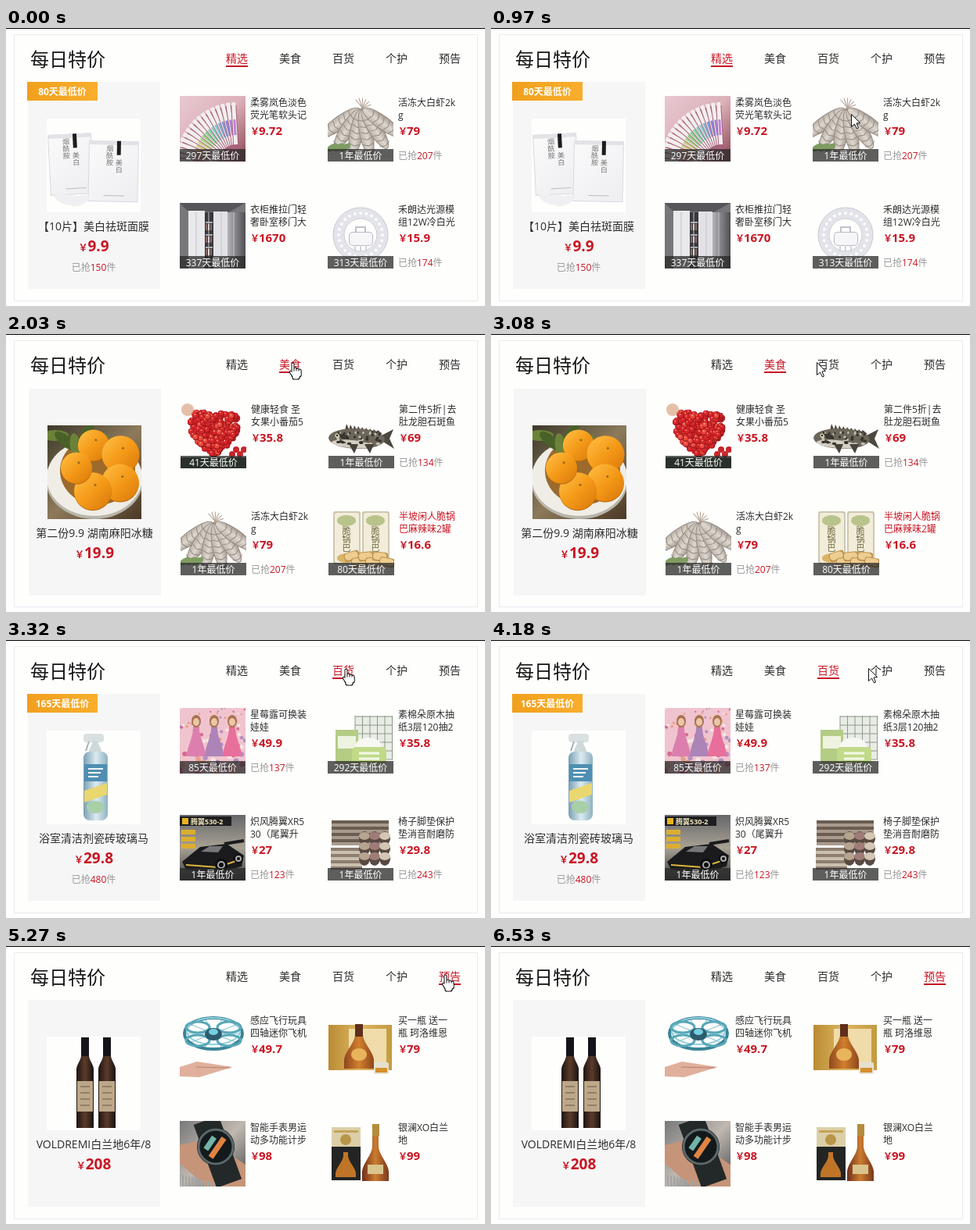
Animation of 612 by 356 pixels, one loop 7.13 s. Source, as an HTML page with a canvas:

```html
<!DOCTYPE html>
<html lang="zh">
<head>
<meta charset="utf-8">
<title>每日特价</title>
<style>
html, body { margin: 0; width: 100%; height: 100%; overflow: hidden; background: #fefefd; }
canvas { display: block; width: 612px; height: 356px; }
</style>
</head>
<body>
<canvas id="stage" width="612" height="356"></canvas>
<script>
const W = 612, H = 356, LOOP = 7130;
const FONT = '"Open Sans", "Noto Sans CJK SC", "Noto Sans CJK", sans-serif';
const PAPER = '#fefefd', INK = '#2c2c2c', RED = '#c81623', GREY = '#999';
const TABS = ['精选', '美食', '百货', '个护', '预告'];
const stage = document.getElementById('stage').getContext('2d');
let g = stage;

// Drawing helpers
const each = (n, f) => { for (let i = 0; i < n; i++) f(i); };
const smooth = k => { k = Math.min(1, Math.max(0, k)); return k * k * (3 - 2 * k); };
const polar = (x, y, r, a) => [x + r * Math.cos(a), y + r * Math.sin(a)];

function rect(c, x, y, w, h) { g.fillStyle = c; g.fillRect(x, y, w, h); }
function round(c, x, y, w, h, r) {
  g.fillStyle = c; g.beginPath(); g.roundRect(x, y, w, h, r); g.fill();
}
function oval(c, x, y, rx, ry = rx, a = 0) {
  g.fillStyle = c; g.beginPath(); g.ellipse(x, y, rx, ry, a, 0, 7); g.fill();
}
function ring(c, w, x, y, rx, ry = rx) {
  g.strokeStyle = c; g.lineWidth = w; g.beginPath(); g.ellipse(x, y, rx, ry, 0, 0, 7); g.stroke();
}
function trace(p) {
  g.beginPath();
  for (let i = 0; i < p.length; i += 2) g.lineTo(p[i], p[i + 1]);
}
function poly(c, ...p) { trace(p); g.fillStyle = c; g.fill(); }
function line(c, w, ...p) { trace(p); g.strokeStyle = c; g.lineWidth = w; g.stroke(); }
function shade(x0, y0, x1, y1, ...cs) {
  const f = g.createLinearGradient(x0, y0, x1, y1);
  cs.forEach((c, i) => f.addColorStop(i / (cs.length - 1), c));
  return f;
}
function turned(x, y, a, draw) {
  g.save(); g.translate(x, y); g.rotate(a); draw(); g.restore();
}
function scatter(seed, n, draw) {
  const rnd = () => (seed = (seed * 16807) % 2147483647) / 2147483647;
  each(n, i => draw(rnd(), rnd(), i));
}
// Bottle outline: a neck that widens smoothly at the shoulder
function flask(c, x, top, bottom, neck, belly, from, to) {
  const half = y => neck + (belly - neck) * smooth((y - from) / (to - from));
  g.beginPath();
  for (let y = top; y <= bottom; y++) g.lineTo(x - half(y), y);
  for (let y = bottom; y >= top; y--) g.lineTo(x + half(y), y);
  g.fillStyle = c; g.fill();
}
function text(s, x, y, size, c, bold = false, align = 'left') {
  g.font = `${bold ? 'bold ' : ''}${size}px ${FONT}`;
  g.textAlign = align;
  g.fillStyle = c;
  g.fillText(s, x, y);
}
function upright(s, x, y, size, c) {
  [...s].forEach((ch, i) => text(ch, x, y + i * size, size, c, false, 'center'));
}
function width(s, size, bold) {
  g.font = `${bold ? 'bold ' : ''}${size}px ${FONT}`;
  return g.measureText(s).width;
}

// Large pictures, 120 x 120
function masks() {
  each(2, i => turned(1 + i * 53, 21 + i * 7, i ? .02 : -.05, () => {
    const w = 56 + i * 8;
    rect('#d9d9dd', 0, 0, w, 78);
    rect(shade(0, 0, w, 78, '#fafafb', '#eeeef1'), 1, 1, w - 2, 76);
    rect('#e2e2e7', 0, 0, w, 5);
    upright('烟酰胺', 23 + i * 4, 13, 9, '#777');
    upright('美白', 35 + i * 4, 31, 9, '#777');
    rect('#1c1c1c', 32 + i * 4, 0, 5, 18);
    line('#bbb', 1, 20, 70, 46, 70);
  }));
  each(3, i => oval('#f0f0f3', 22 + i * 10, 103 + i, 13, 6, .4 - i * .4));
}
function oranges() {
  rect(shade(0, 0, 120, 120, '#3b3829', '#8d7a5b', '#4b3826'), 0, 0, 120, 120);
  oval('#b9b5aa', 60, 70, 62, 50);
  oval('#efede6', 60, 67, 61, 49);
  oval('#9b6a2c', 64, 58, 48, 44);
  each(5, i => oval(i % 2 ? '#496128' : '#6b8238', 10 + i * 13, 13 + i % 3 * 7, 17, 7, i * .7));
  each(5, i => {
    const [x, y] = polar(68, 55, 31, -1.87 + i * Math.PI * .4), r = i && i < 4 ? 24 : 20;
    oval('#b9690c', x, y + 1, r);
    oval(shade(x - r, y - r, x + r, y + r, '#ffc24a', '#f59a18', '#d8770a'), x, y, r);
    oval('#8d6a20', x + 3, y - r / 3, 1.5);
  });
}
function sprayer() {
  const body = shade(48, 0, 78, 0, '#7fa3b5', '#dcebf2', '#8fb2c0');
  round('#d9e0e2', 47, 4, 26, 11, 4);
  line('#a5b0b4', 2, 54, 14, 50, 26);
  flask('#cfd8da', 62, 13, 27, 4, 8, 15, 27);
  round(body, 47, 27, 31, 88, 8);
  rect('#4f8fb3', 48, 43, 29, 22);
  each(3, i => line('#f2f6f8', 2, 53, 49 + i * 5, 72 - i * 3, 49 + i * 5));
  poly('#e9d76f', 48, 77, 77, 67, 77, 82, 48, 92);
  oval('#a8cfa8', 62, 98, 11, 8);
}
function herbs() {
  rect(shade(24, 0, 107, 0, '#6f9fa0', '#79a79b', '#f0ead6'), 24, 14, 83, 50);
  rect('#f0ead6', 84, 14, 23, 50);
  scatter(17, 16, (u, v, i) =>
    oval(['#d58a4e', '#efe2c4', '#b8503c', '#37696d'][i % 4], 30 + u * 48, 22 + v * 36, 7, 4, v * 3));
  round('#6b4634', 9, 61, 41, 58, 8);
  rect('#2f2c2a', 12, 52, 36, 13);
  rect('#d9b88a', 10, 73, 39, 31);
  scatter(29, 9, (u, v, i) => oval(i % 2 ? '#b2473a' : '#5f8f8d', 14 + u * 18, 77 + v * 23, 4, 3));
  rect('#f0e6d0', 35, 77, 9, 24);
  turned(65, 76, .06, () => { rect('#f1ebd8', 0, 0, 39, 32); oval('#a09a85', 20, 16, 4); });
}
function bottles() {
  each(2, i => {
    const x = 49 + i * 28;
    flask(shade(x - 11, 0, x + 11, 0, '#1d1512', '#5c3b2b', '#1a1311'), x, 1, 117, 5, 11, 24, 42);
    rect('#17131a', x - 5, 1, 10, 24);
    rect('#bda789', x - 10, 57, 20, 39);
    each(4, j => line('#6c5543', 1, x - 6, 64 + j * 8, x + 6, 64 + j * 8));
  });
}

// Small pictures, 84 x 84
function pens() {
  rect(shade(0, 0, 84, 84, '#e8c9d2', '#dcb0b8', '#8a4552'), 0, 0, 84, 84);
  each(19, i => {
    const a = 3 + i * .092, pen = (c, w, r0, r1) =>
      line(c, w, ...polar(73, 86, r0, a), ...polar(73, 86, r1, a));
    pen('#a8627a', 7, 10, 74);
    pen('#f3eeee', 5, 24, 78);
    pen(`hsl(${i * 19 + 300},50%,68%)`, 3, 36, 56);
  });
}
function shrimp() {
  each(6, i => turned(43, 15, .95 - i * .38, () => {
    oval('#8f867e', 0, 32, 9, 30);
    oval(shade(-8, 0, 8, 0, '#bdb4aa', '#ded8d0', '#a89f96'), 0, 32, 8, 29);
    each(6, j => line('#928980', 1, -7, 15 + j * 8, 0, 18 + j * 8, 7, 15 + j * 8));
    line('#b09f90', 1, 0, 4, 4, -12);
  }));
  each(3, i => oval('#7f9c62', 6 + i * 8, 66, 8, 4, -.5));
}
function wardrobe() {
  rect('#77777a', 0, 0, 84, 84);
  poly('#55555a', 0, 0, 84, 0, 62, 12, 10, 10);
  rect('#e9e9ec', 11, 10, 21, 74);
  rect('#38383c', 32, 12, 11, 72);
  rect('#e2e2e6', 43, 11, 18, 73);
  rect(shade(61, 0, 84, 0, '#b3b3b8', '#4e4e53'), 61, 12, 23, 72);
  each(4, i => {
    rect('#aaaab0', 33, 24 + i * 16, 9, 2);
    each(3, j => rect(j % 2 ? '#e0d8d2' : '#8a6c66', 33 + j * 3, 27 + i * 16, 2, 8));
    line('#c3c3c9', 1, 21 + i * 16, 12, 21 + i * 16, 84);
  });
}
function lamp() {
  ring('#e3e3ea', 13, 42, 41, 28);
  [21, 35].forEach(r => ring('#c5c5cf', 1, 42, 41, r));
  each(24, i => oval('#fbfbff', ...polar(42, 41, 28, i * Math.PI / 12), 2));
  round('#b8b8c2', 27, 37, 31, 18, 5);
  round('#f6f6f9', 28, 38, 29, 16, 4);
  line('#c2c2cc', 2, 36, 37, 36, 31, 48, 31, 48, 37);
  each(3, i => line('#d2d2da', 2, 35 + i * 7, 54, 35 + i * 7, 62));
}
function tomatoes() {
  oval('#e5c0a8', 9, 9, 8);
  rect('#2f4a30', 0, 70, 84, 14);
  scatter(53, 420, (s, v, i) => {
    const x = 8 + s * 70, y = 12 + v * 56, a = (x - 43) / 27, b = (42 - y) / 26;
    if ((a * a + b * b - 1) ** 3 > a * a * b ** 3) return;
    oval('#a3181c', x, y, 4);
    oval(i % 3 ? '#d8262a' : '#ea4a3c', x - .5, y - .5, 3.2);
    oval('#ffc4b4', x - 1, y - 1.5, .8);
  });
  each(4, i => oval('#c9262a', 66 + i * 5, 66 - i % 2 * 6, 4));
}
function grouper() {
  poly('#4c473f', 62, 45, 83, 34, 78, 46, 84, 59);
  each(9, i => poly('#4c473f', 20 + i * 5, 40, 23 + i * 5, 27 + i, 29 + i * 5, 40));
  oval('#6d665a', 36, 46, 36, 13, .03);
  oval('#d6d0c4', 30, 53, 26, 5, .1);
  scatter(34, 55, (u, v, i) =>
    oval(i % 3 ? '#35322d' : '#c9c2b4', 12 + u * 54, 37 + v * 17, 1 + v * 2, 1.6));
  each(2, i => poly('#47423a', 26 + i * 20, 53, 38 + i * 20, 53, 33 + i * 20, 65));
  oval('#efe6c8', 11, 42, 2.5);
  oval('#1f1d1a', 11, 42, 1.3);
}
function snacks() {
  each(2, i => {
    const x = 6 + i * 37;
    round('#cfc8ae', x, 2, 35, 68, 3);
    round('#f2ecda', x + 2, 4, 31, 64, 3);
    oval('#b9c38c', x + 17, 14, 12, 7);
    upright('脆锅巴', x + 17, 31, 11, '#6c6a3e');
    oval('#d9b466', x + 17, 62, 12, 6);
  });
  each(6, i => turned(28 + i * 9, 60 + i % 2 * 7, -.3 + i * .1, () => {
    round('#bf9350', -8, -6, 20, 12, 4);
    round('#edcd90', -7, -5, 17, 9, 4);
  }));
}
function dolls() {
  rect('#f0c4ce', 0, 0, 84, 84);
  scatter(91, 90, (u, v, i) =>
    oval(['#d86a94', '#f8e6e2', '#b48fc0', '#e8a08a'][i % 4], u * 84, v * 84, 1 + v * 3));
  each(3, i => {
    const x = 21 + i * 23, c = ['#dd7fae', '#ac84b8', '#e86f9b'][i];
    flask(c, x, 24, 62, 4, 12, 26, 62);
    oval('#a8744e', x, 17, 6, 8);
    oval('#ecc6aa', x, 18, 4, 5);
  });
}
function tissues() {
  rect('#e9ece6', 35, 10, 48, 56);
  each(6, i => {
    line('#8c9a86', 1, 35 + i * 9.5, 10, 35 + i * 9.5, 66);
    line('#8c9a86', 1, 35, 11 + i * 11, 83, 11 + i * 11);
  });
  rect('#b4cc84', 10, 28, 29, 43);
  rect('#eef3e0', 13, 36, 23, 16);
  oval('#f7f8f4', 52, 49, 17, 11);
  round('#c0da88', 31, 50, 44, 22, 5);
  each(2, i => line('#f4f8e8', 3, 40, 58 + i * 7, 66, 58 + i * 7));
}
function racer() {
  rect(shade(0, 0, 0, 84, '#66666a', '#a8a294', '#3c3c3e'), 0, 0, 84, 84);
  rect('#1e1e20', 0, 2, 66, 12);
  rect('#e8b422', 3, 4, 8, 8);
  text('腾翼530-2', 14, 12, 9, '#f2e7c0', true);
  each(3, i => rect('#dcae30', 2, 19 + i * 9, 18, 6));
  poly('#1b1b1d', 3, 60, 26, 41, 60, 37, 82, 52, 79, 66, 49, 74, 8, 70);
  poly('#77777a', 27, 47, 38, 40, 55, 40, 49, 48);
  line('#dcb43c', 2, 8, 64, 48, 67, 78, 57);
  line('#1b1b1d', 4, 57, 37, 82, 33);
  each(2, i => {
    oval('#0c0c0d', 53 + i * 22, 64 - i * 8, 8 - i * 2);
    ring('#aaa', 2, 53 + i * 22, 64 - i * 8, 4 - i);
  });
}
function pads() {
  each(8, i => rect(i % 2 ? '#a89a8c' : '#6b5d52', 5, 7 + i * 4, 73, 4));
  each(7, i => rect(i % 2 ? '#cbbfae' : '#8d7e70', 4, 42 + i * 4, 40, 4));
  each(9, i => {
    const x = 47 + i % 3 * 13, y = 30 + Math.floor(i / 3) * 13;
    oval('#584a42', x, y, 7, 9);
    oval(['#b6a490', '#a07c78', '#d2c6b4'][i % 3], x, y - 3, 7, 5);
  });
}
function wax() {
  round('#e0e0de', 28, 9, 29, 22, 3);
  rect('#8c8880', 27, 27, 31, 4);
  round(shade(26, 0, 59, 0, '#c08434', '#f3d596', '#b87a30'), 27, 30, 31, 40, 4);
  rect('#a83c2c', 28, 48, 29, 13);
  text('发蜡棒', 42, 58, 9, '#fff1d9', true, 'center');
}
function glycerin() {
  rect(shade(0, 0, 84, 84, '#8cc8cf', '#dcd6dc', '#7bbcc8'), 0, 0, 84, 84);
  each(4, i => ring('#5cadc4', 2, 72, 13 + i * 19, 9, 8));
  turned(40, 40, .2, () => {
    round('#f0e4e4', -16, -31, 32, 57, 6);
    round('#e0a8b6', -15, -4, 30, 28, 5);
    rect('#f7f4f2', -8, 26, 16, 12);
    text('甘油', 0, -12, 10, '#75919c', true, 'center');
  });
}
function hairspray() {
  rect('#e2dede', 36, 2, 12, 9);
  round(shade(31, 0, 53, 0, '#d08c9c', '#f6ccd2', '#d698a6'), 32, 10, 20, 62, 5);
  rect('#f6eaea', 34, 23, 16, 17);
  text('蓬松', 42, 35, 8, '#a0506c', true, 'center');
  each(9, i => oval('#c05078', 36 + i % 3 * 6, 46 + Math.floor(i / 3) * 7, 2));
}
function paste() {
  rect('#1c2426', 0, 0, 84, 84);
  rect('#d8d4c8', 3, 3, 8, 6);
  each(2, i => {
    const y = 24 + i * 36;
    oval('#0c1011', 62, y, 21);
    ring('#5a7f84', 3, 62, y, 18);
    oval('#30454a', 59, y - 4, 11);
  });
  rect('#2e9095', 43, 45, 38, 14);
  ['塑形发蜡', '自然蓬松'].forEach((s, i) => text(s, 2, 28 + i * 13, 10, '#eee8d0', true));
  rect('#c8302a', 1, 46, 38, 13);
  text('买1送1', 20, 56, 10, '#fff4df', true, 'center');
}
function drone() {
  each(10, i => line('#7cc0cc', 1, 43, 25, 43 + Math.cos(i * .63) * 37, 25 + Math.sin(i * .63) * 20));
  ring('#3a8496', 4, 43, 25, 37, 20);
  ring('#8fd0dc', 2, 43, 22, 34, 17);
  each(4, i => ring('#58a8b8', 3, 23 + i % 2 * 40, 17 + (i >> 1) * 17, 15, 7));
  oval('#2c5c6e', 43, 26, 11, 8);
  oval('#76cfe0', 43, 23, 6, 4);
  poly('#e0b09c', 0, 68, 22, 61, 68, 68, 48, 74, 25, 81, 0, 80);
  line('#b4826e', 1, 21, 68, 64, 69);
}
function brandy() {
  rect(shade(0, 0, 82, 0, '#b98a32', '#dcb661', '#c49a42'), 1, 14, 81, 58);
  rect('#efdcaa', 27, 19, 48, 48);
  flask(shade(20, 0, 60, 0, '#8c431c', '#d2802e', '#8c431c'), 40, 13, 70, 5, 19, 26, 60);
  rect('#5e2f1c', 35, 13, 10, 16);
  oval('#e8b45c', 40, 52, 10, 8);
  round('#e6e0d2', 59, 62, 19, 15, 2);
  rect('#d68f2c', 61, 69, 15, 6);
}
function watch() {
  rect(shade(0, 0, 84, 84, '#77797a', '#c0b8b0', '#444a4c'), 0, 0, 84, 84);
  poly('#c69478', 0, 31, 34, 23, 84, 56, 84, 84, 34, 84, 0, 54);
  turned(46, 33, -.35, () => rect('#232829', -17, -36, 34, 86));
  each(12, i => line('#a3a4a4', 2, i * 4, 68 + i, i * 4, 84));
  oval('#141a1c', 46, 33, 24);
  ring('#5c686a', 3, 46, 33, 22);
  turned(46, 33, .6, () => {
    rect('#e08444', -1, -15, 7, 30);
    rect('#72b4a8', -12, -9, 7, 19);
  });
}
function cognac() {
  rect('#dccfa8', 5, 8, 37, 26);
  rect('#232524', 5, 33, 37, 43);
  rect('#c4a458', 8, 12, 31, 3);
  oval('#b89648', 23, 24, 7);
  flask('#c07428', 23, 40, 72, 3, 13, 44, 68);
  flask(shade(44, 0, 78, 0, '#70301a', '#cc7c30', '#7a381c'), 61, 8, 77, 4, 17, 32, 66);
  rect('#b48c3c', 57, 4, 9, 15);
  rect('#d8c48c', 51, 56, 20, 12);
}

const item = (pic, a, b, price, badge, sold, ink = INK) => ({ pic, a, b, price, badge, sold, ink });
const PAGES = [
  { pic: masks, title: '【10片】美白祛斑面膜', price: '9.9', badge: '80天最低价', sold: '150', items: [
    item(pens, '柔雾岚色淡色', '荧光笔软头记', '9.72', '297天'),
    item(shrimp, '活冻大白虾2k', 'g', '79', '1年', '207'),
    item(wardrobe, '衣柜推拉门轻', '奢卧室移门大', '1670', '337天'),
    item(lamp, '禾朗达光源模', '组12W冷白光', '15.9', '313天', '174')] },
  { pic: oranges, title: '第二份9.9 湖南麻阳冰糖', price: '19.9', shift: 1, items: [
    item(tomatoes, '健康轻食 圣', '女果小番茄5', '35.8', '41天'),
    item(grouper, '第二件5折|去', '肚龙胆石斑鱼', '69', '1年', '134'),
    item(shrimp, '活冻大白虾2k', 'g', '79', '1年', '207'),
    item(snacks, '半坡闲人脆锅', '巴麻辣味2罐', '16.6', '80天', '', RED)] },
  { pic: sprayer, title: '浴室清洁剂瓷砖玻璃马', price: '29.8', badge: '165天最低价', sold: '480', items: [
    item(dolls, '星莓露可换装', '娃娃', '49.9', '85天', '137'),
    item(tissues, '素棉朵原木抽', '纸3层120抽2', '35.8', '292天'),
    item(racer, '炽风腾翼XR5', '30（尾翼升', '27', '1年', '123'),
    item(pads, '椅子脚垫保护', '垫消音耐磨防', '29.8', '1年', '243')] },
  { pic: herbs, title: '艾草肚脐贴三伏贴大肚', price: '19.9', badge: '317天最低价', items: [
    item(wax, '发蜡棒买1送1', '儿童碎发整理', '27.2', '174天', '187'),
    item(glycerin, '护肤甘油柔滑', '滋润补水保湿', '20', '108天', '137'),
    item(hairspray, '头发蓬松免洗', '干发喷雾买1', '34', '1年'),
    item(paste, '柔蔓雅 哑光', '定型蓬松发蜡', '17.8', '1年', '544')] },
  { pic: bottles, title: 'VOLDREMI白兰地6年/8', price: '208', items: [
    item(drone, '感应飞行玩具', '四轴迷你飞机', '49.7'),
    item(brandy, '买一瓶 送一', '瓶 珂洛维恩', '79'),
    item(watch, '智能手表男运', '动多功能计步', '98'),
    item(cognac, '银澜XO白兰', '地', '99')] }
];

function picture(draw, x, y, size) {
  g.save();
  g.beginPath(); g.rect(x, y, size, size); g.clip();
  g.translate(x, y);
  rect(PAPER, 0, 0, size, size);
  draw();
  g.restore();
}
function soldLine(n, x, y) {
  text('已抢', x, y, 12, GREY);
  text(n, x + 24, y, 12, RED);
  text('件', x + 24 + width(n, 12), y, 12, GREY);
}
function mainCard(p) {
  rect('#f6f6f7', 28, 69, 169, 265);
  picture(p.pic, 52, 116, 120);
  if (p.badge) {
    rect(shade(27, 0, 117, 0, '#f0a01e', '#f8ae2c'), 27, 69, 90, 24);
    text(p.badge, 72, 86, 12, '#fff', true, 'center');
  }
  text(p.title, 112, 259, 14, INK, false, 'center');
  const x = 112 - (width(p.price, 19, true) + 12) / 2;
  text('￥', x, 286, 12, RED, true);
  text(p.price, x + 12, 286, 19, RED, true);
  if (p.sold) soldLine(p.sold, 112 - (36 + width(p.sold, 12)) / 2, 311);
}
function smallCard(it, i) {
  const x = 222 + i % 2 * 189, y = 87 + (i >> 1) * 137;
  picture(it.pic, x, y, 84);
  if (it.badge) {
    rect('rgba(40,40,40,.75)', x, y + 68, 84, 16);
    text(it.badge + '最低价', x + 42, y + 81, 12, '#fff', false, 'center');
  }
  text(it.a, x + 90, y + 13, 12, it.ink);
  text(it.b, x + 90, y + 29, 12, it.ink);
  text('￥', x + 90, y + 50, 12, RED, true);
  text(it.price, x + 101, y + 50, 15, RED, true);
  if (it.sold) soldLine(it.sold, x + 90, y + 81);
}
const tabX = i => 281 + i * 68;

function render(p, active) {
  const sheet = document.createElement('canvas');
  sheet.width = W; sheet.height = H;
  g = sheet.getContext('2d');
  rect(PAPER, 0, 0, W, H);
  rect('#000', 0, 0, W, 1);
  g.strokeStyle = '#ebebee'; g.lineWidth = 1;
  g.strokeRect(10.5, 8.5, 592, 341);
  text('每日特价', 31, 49, 24, '#161616');
  TABS.forEach((s, i) => text(s, tabX(i), 44, 14, i === active ? RED : INK));
  rect(RED, tabX(active), 48, 28, 2);
  g.translate(p.shift || 0, p.shift || 0);
  mainCard(p);
  p.items.forEach(smallCard);
  return sheet;
}
const sheets = PAGES.map(render);

// Pointer legs: start, end and where each one stops
const leg = (from, to, x, y = 37) => ({ from, to, x, y });
const rest = i => tabX(i) + 18;
const LEGS = [
  leg(490, 1180, 416, 90),
  leg(1180, 2030, rest(1)),
  leg(2590, 3320, rest(2)),
  leg(3730, 4440, rest(3)),
  leg(4820, 5370, rest(4)),
  leg(5760, 5960, 597, 52)
];
const easeOut = k => 1 - (1 - k) ** 1.2;

function tabUnder(x, y) {
  return y < 50 ? TABS.findIndex((_, i) => x > tabX(i) + 1 && x < tabX(i) + 28) : -1;
}
// The page follows the last tab the pointer has touched
function stateAt(t) {
  let x = 604, y = 176, page = 0, tab = -1;
  for (const l of LEGS) {
    if (t < l.from) break;
    const k = easeOut(Math.min(1, (t - l.from) / (l.to - l.from)));
    x = Math.round(x + (l.x - x) * k);
    y = Math.round(y + (l.y - y) * k);
    tab = tabUnder(x, y);
    if (tab >= 0) page = tab;
  }
  return { x, y, page, link: tab >= 0, shown: t >= LEGS[0].from && t < 6490 };
}
function hand(c, grow) {
  const part = (x, y, w, h) => round(c, x - grow, y - grow, w + 2 * grow, h + 2 * grow, 2);
  part(-1, 1, 2, 14);
  each(3, i => part(2 + i * 3, 7 + i, 2, 8));
  part(-1, 11, 11, 7);
  part(0, 15, 8, 6);
  turned(-4, 12, -.6, () => part(0, 0, 2, 6));
}
function drawPointer(x, y, link) {
  g.save();
  g.translate(x - .5, y - .5);
  if (link) {
    hand('#111', 1);
    hand('#fff', 0);
  } else {
    poly('#fff', 0, 0, 0, 16, 4, 12.5, 7, 18.5, 9, 17.5, 6.5, 11.5, 11, 11);
    g.closePath(); g.strokeStyle = '#111'; g.lineWidth = 1; g.stroke();
  }
  g.restore();
}
function frame(t) {
  const s = stateAt(t);
  g = stage;
  g.drawImage(sheets[s.page], 0, 0);
  if (s.shown) drawPointer(s.x, s.y, s.link);
}
const start = performance.now();
function tick() {
  frame((performance.now() - start) % LOOP);
  requestAnimationFrame(tick);
}
tick();
</script>
</body>
</html>
```
